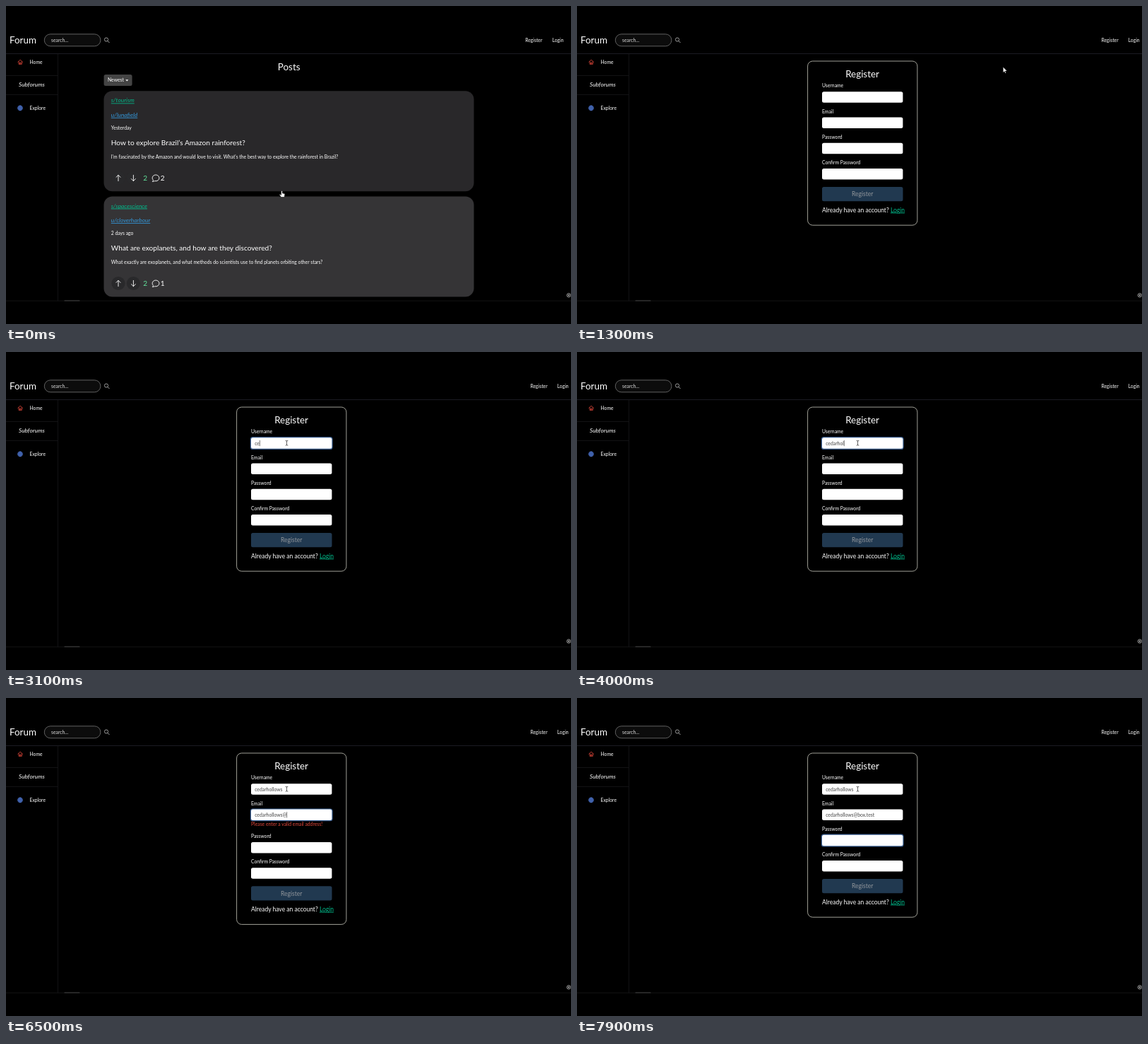
An HTML page for the animation above (8 s loop, 800 by 450 pixels).

```html
<!DOCTYPE html>
<html lang="en">
<head>
<meta charset="utf-8">
<title>Forum sign-up</title>
<style>
  html, body { margin: 0; width: 100%; height: 100%; overflow: hidden; background: #000; }
  svg { display: block; width: 800px; height: 450px; font-family: Lato, sans-serif; }
  .line { fill: none; stroke-linecap: round; stroke-linejoin: round; }
  .system { font-family: "Open Sans", sans-serif; }
</style>
</head>
<body>
<svg id="stage" viewBox="0 0 800 450"></svg>
<script>
const LOOP = 8000;
const SMALL = 6.8, MEDIUM = 8.5, TITLE = 10.15, LARGE = 13.4;
const GREEN = '#00bc8c', BLUE = '#3498db';
const USER = 'cedarhollows', EMAIL = 'cedarhollows@box.test';

const text = (x, y, size, content, attrs = '') =>
  `<text x="${x}" y="${y}" font-size="${size}" fill="#fff" ${attrs}>${content}</text>`;
const rect = (x, y, w, h, r, fill, attrs = '') =>
  `<rect x="${x}" y="${y}" width="${w}" height="${h}" rx="${r}" fill="${fill}" ${attrs}/>`;
const line = (d, color, width = 0.8, attrs = '') =>
  `<path class="line" d="${d}" stroke="${color}" stroke-width="${width}" ${attrs}/>`;
const link = (x, y, label, color) =>
  text(x, y, 8.3, label, `style="fill:${color}" font-style="italic" text-decoration="underline"`);

const chrome = () => `
  ${text(5, 53, LARGE, 'Forum')}
  ${rect(54.3, 39.8, 79.6, 17, 8.5, '#0c0c0c', 'stroke="#777" stroke-width=".8"')}
  ${text(64, 50.6, SMALL, 'search...', 'style="fill:#ddd"')}
  <circle cx="142" cy="47.5" r="2.6" fill="none" stroke="#bbb" stroke-width=".8"/>
  ${line('M144 49.5L146.2 51.7', '#bbb', 0.9)}
  ${line('M0 67.5H800', '#24242c')}
  ${line('M73.5 68V417M0 98.5H73M0 125.5H73', '#1b1b1e', 0.7)}
  ${line('M0 417.2H800', '#18181a', 0.8)}
  ${line('M83 417H104', '#4a4a4a', 0.9)}
  ${line('M17 79.3L20.2 76L23.4 79.3M18 78.6V82.3H22.4V78.6M19.5 82V80H20.9V82', '#e0483c', 0.8)}
  ${text(33.5, 81.8, SMALL, 'Home')}
  ${text(18, 113.5, 8.3, 'Subforums', 'font-style="italic"')}
  <circle cx="20" cy="144.4" r="3.4" fill="#2a4480" stroke="#4f78d0" stroke-width=".7"/>
  ${line('M16.8 144.4H23.2M20 141V147.8M20 141Q16.8 144.4 20 147.8Q23.2 144.4 20 141', '#5c86dc', 0.5)}
  ${text(33.5, 146.8, SMALL, 'Explore')}
  <circle cx="796.8" cy="409.3" r="2.6" fill="none" stroke="#ccc" stroke-width=".8"/>
  <circle cx="796.8" cy="409.3" r="1.1" fill="#ccc"/>`;

const post = (top, id, sub, user, date, title, body, votes, comments) => `
  <g transform="translate(0 ${top})">
    ${rect(138.5, 0, 524, 142, 12, '#353436', `id="${id}"`)}
    ${link(148.8, 16.2, 's/' + sub, GREEN)}
    ${link(148.8, 36.6, 'u/' + user, BLUE)}
    ${text(148.8, 54.9, SMALL, date)}
    ${text(148.8, 76.6, TITLE, title)}
    ${text(148.8, 96.1, SMALL, body)}
    <circle cx="159" cy="123.1" r="9.6" fill="#29292b"/>
    <circle cx="180.4" cy="123.1" r="9.6" fill="#29292b"/>
    ${line('M159 127.3V119M156 122L159 119L162 122', '#fff', 0.9)}
    ${line('M180.4 119V127.3M177.4 124.3L180.4 127.3L183.4 124.3', '#fff', 0.9)}
    ${text(194.2, 126.8, TITLE, votes, 'style="fill:#62e39b"')}
    ${line('M207.7 128C208.4 127.3 208.5 126.6 208.3 125.9A4.9 4.4 0 1 1 210.7 127.3Q209.2 128 207.7 128Z', '#fff', 0.9)}
    ${text(218.8, 126.8, TITLE, comments)}
  </g>`;

const postsPage = () => `
  ${text(400.7, 90.6, LARGE, 'Posts', 'text-anchor="middle"')}
  ${rect(138.6, 97, 40, 16, 2.5, '#444')}
  ${text(144, 107.4, SMALL, 'Newest')}
  <path d="M169.3 104.3H173.3L171.3 106.4Z" fill="#fff"/>
  ${post(120.3, 'post', 'tourism', 'lunafield', 'Yesterday', 'How to explore Brazil’s Amazon rainforest?',
    'I\'m fascinated by the Amazon and would love to visit. What\'s the best way to explore the rainforest in Brazil?', 2, 2)}
  ${post(269.4, 'post2', 'spacescience', 'cloverharbour', '2 days ago', 'What are exoplanets, and how are they discovered?',
    'What exactly are exoplanets, and what methods do scientists use to find planets orbiting other stars?', 2, 1)}`;

const field = (y, label, id) => `
  ${text(347, y - 6.1, SMALL, label)}
  ${rect(346.6, y - 0.4, 115.2, 16.3, 2.8, 'none', `id="${id}Ring" stroke="#3a5f92" stroke-width="1.6"`)}
  ${rect(347, y, 114.4, 15.5, 2.5, '#fff')}
  ${text(352.2, y + 10.2, SMALL, '', `id="${id}" style="fill:#444"`)}
  ${line(`M0 ${y + 4}V${y + 11.5}`, '#222', 0.6, `id="${id}Caret"`)}`;

const registerPage = () => `
  ${rect(326.6, 78, 155.3, 232.2, 7, '#000', 'id="card" stroke="#c8c8bd" stroke-width=".8"')}
  ${text(404, 101.1, LARGE, 'Register', 'text-anchor="middle"')}
  ${field(121.3, 'Username', 'user')}
  ${field(157.6, 'Email', 'email')}
  ${text(347, 181, SMALL, 'Please enter a valid email address!', 'id="error" style="fill:#e0463a"')}
  <g id="lower">
    ${field(193.8, 'Password', 'pass')}
    ${field(230.1, 'Confirm Password', 'confirm')}
    ${rect(347, 256, 114.5, 20.2, 2.5, '#213950')}
    ${text(404.2, 269.4, MEDIUM, 'Register', 'text-anchor="middle" style="fill:#92969b"')}
    ${text(347, 291.5, MEDIUM, `Already have an account? <tspan fill="${GREEN}" text-decoration="underline">Login</tspan>`)}
  </g>
  <g id="suggestions" class="system">
    <path d="M394.5 142L397.5 138.8L400.5 142Z" fill="#182126"/>
    ${rect(388.3, 141.6, 65.6, 94.6, 2.5, '#182126')}
    ${['mosslane', 'Moss', 'MossLane', 'M', 'demoacct', 'pelikraj'].map((name, i) =>
      text(393.3, 152.6 + i * 15.2, 5.3, name, 'font-weight="600"')).join('')}
  </g>`;

const cursors = () => `
  <g id="cursor">
    <path id="hand" d="M-.9 .6Q0 -.5 .9 .6V3.4L3.7 4Q4.4 4.3 4.3 5.2L3.6 9H-.9L-3.3 5.7Q-3 4.5 -1.8 5.2L-.9 6Z"
      fill="#fff" stroke="#000" stroke-width=".5"/>
    <path id="arrow" d="M0 0V8L1.9 6.3L3.1 9L4.3 8.4L3.1 5.8H5.7Z" fill="#fff" stroke="#000" stroke-width=".5"/>
    ${line('M-1.4 -3.4Q0 -3.4 0 -2.6Q0 -3.4 1.4 -3.4M0 -2.6V2.6M-1.4 3.4Q0 3.4 0 2.6Q0 3.4 1.4 3.4', '#222', 0.7, 'id="beam"')}
  </g>`;

document.getElementById('stage').innerHTML = `
  <rect width="800" height="450"/>
  ${chrome()}
  ${rect(736, 37, 37.6, 22.8, 11.4, '#363636', 'id="pill"')}
  <g id="nav">${text(742.4, 50.8, SMALL, 'Register')}${text(780.6, 50.8, SMALL, 'Login')}</g>
  <g id="posts">${postsPage()}</g>
  <g id="register">${registerPage()}</g>
  <g id="status" class="system">
    ${rect(0, 407.8, 56, 8.8, 1, '#1c2b36')}
    ${text(1.5, 413.8, 4.7, 'localhost:4200/register', 'style="fill:#d5e2ea"')}
  </g>
  ${cursors()}`;

const $ = id => document.getElementById(id);
const show = (id, on) => $(id).setAttribute('display', on ? 'inline' : 'none');
const clamp = (v, lo, hi) => Math.max(lo, Math.min(hi, v));
const inside = (p, x, y, w, h) => p.x >= x && p.x <= x + w && p.y >= y && p.y <= y + h;

const PATH = [[100, 390.5, 261.5], [400, 738, 58.5], [1000, 738, 58.5], [1700, 397.5, 128.8]];

function pointerAt(t) {
  let [, x, y] = PATH[0];
  for (let i = 1; i < PATH.length; i++) {
    const [t0, x0, y0] = PATH[i - 1], [t1, x1, y1] = PATH[i];
    if (t < t0) break;
    const k = clamp((t - t0) / (t1 - t0), 0, 1), e = k * k * (3 - 2 * k);
    x = x0 + (x1 - x0) * e;
    y = y0 + (y1 - y0) * e;
  }
  return { x, y };
}

function userCount(t) {
  return clamp(Math.floor((t - 2900) / 145) + 1, 0, USER.length);
}

function emailCount(t) {
  const n = t < 5500 ? Math.floor((t - 4850) / 120) + 1 : 6 + Math.floor((t - 5500) / 140);
  return clamp(n, 0, EMAIL.length);
}

function setField(id, value, focused) {
  const node = $(id);
  node.textContent = value;
  show(id + 'Ring', focused);
  show(id + 'Caret', focused && value);
  if (focused && value) {
    const x = 352.6 + node.getComputedTextLength();
    $(id + 'Caret').setAttribute('transform', `translate(${x} 0)`);
  }
}

function render(t) {
  const onPosts = t < 450;
  const navShift = onPosts ? -7.2 : 0;
  const p = pointerAt(t);
  const overRegister = inside(p, 736 + navShift, 37, 37.6, 22.8);
  const overPost = onPosts && inside(p, 138.5, 120.3, 524, 142);
  const overField = !onPosts && inside(p, 347, 121.3, 114.4, 15.5);

  show('posts', onPosts);
  show('register', !onPosts);
  $('nav').setAttribute('transform', `translate(${navShift} 0)`);
  $('pill').setAttribute('transform', `translate(${navShift} 0)`);
  show('pill', overRegister);
  show('status', overRegister);
  $('post').setAttribute('fill', overPost ? '#29282a' : '#353436');

  const typed = emailCount(t);
  const invalid = typed > 0 && typed < EMAIL.length - 1;
  const shift = invalid ? 10.2 : 0;
  const focus = t < 1950 ? '' : t < 4650 ? 'user' : t < 7750 ? 'email' : 'pass';
  setField('user', USER.slice(0, userCount(t)), focus === 'user');
  setField('email', EMAIL.slice(0, typed), focus === 'email');
  setField('pass', '', focus === 'pass');
  setField('confirm', '', false);
  show('suggestions', t >= 1950 && t < 2900);
  show('error', invalid);
  $('lower').setAttribute('transform', `translate(0 ${shift})`);
  $('card').setAttribute('height', 232.2 + shift);

  $('cursor').setAttribute('transform', `translate(${p.x} ${p.y})`);
  const hand = overRegister || overPost;
  show('hand', hand);
  show('beam', overField);
  show('arrow', !hand && !overField);
}

const start = performance.now();
function tick() {
  render((performance.now() - start) % LOOP);
  requestAnimationFrame(tick);
}
tick();
</script>
</body>
</html>
```
